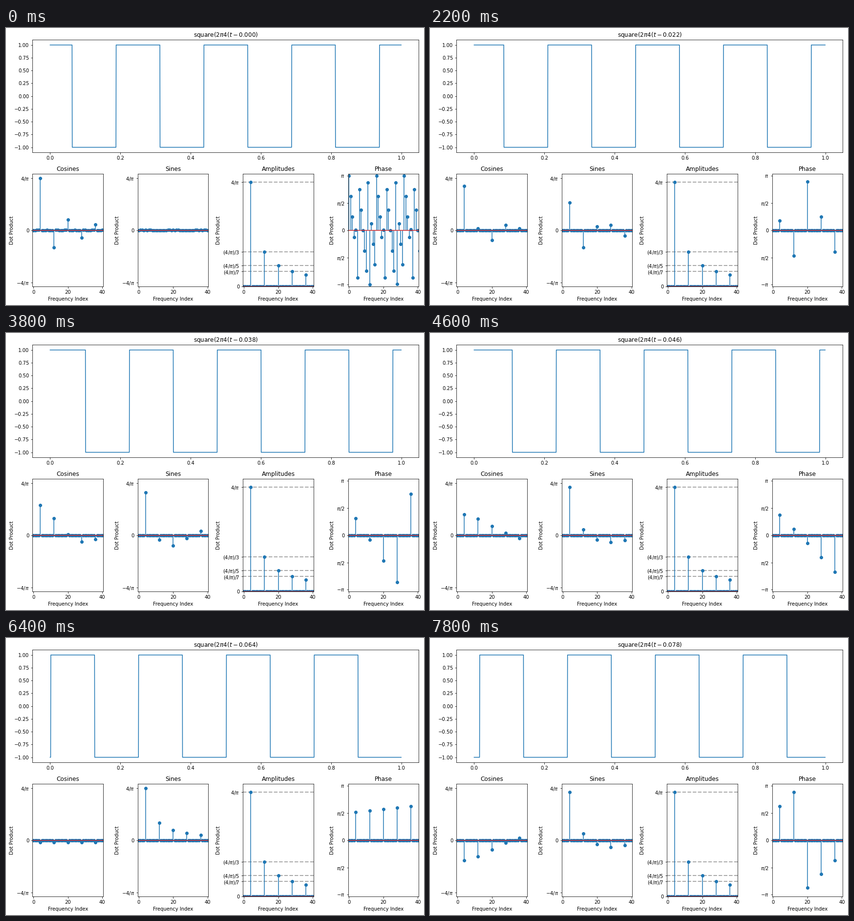
Write a matplotlib script that moves like this. It is 856 by 568 pixels and loops after 8 s.

```python
import numpy as np
import matplotlib.pyplot as plt
from matplotlib.animation import FuncAnimation

W, H, DPI = 856, 568, 72
FRAMES, INTERVAL = 40, 200
FREQ, N = 4, 2000
PEAK = 4 / np.pi

plt.rcParams.update({"font.family": "DejaVu Sans", "font.size": 10})

t = np.arange(N) / N
index = np.arange(50)
angles = 2 * np.pi * np.outer(index, t)
cos_basis, sin_basis = np.cos(angles), np.sin(angles)
shifts = np.linspace(0, 1, 500)[:FRAMES]

fig = plt.figure(figsize=(W / DPI, H / DPI), dpi=DPI, facecolor="white")


def add_axes(left, top, width, height):
    """Place axes by pixel, measured from the top left corner."""
    return fig.add_axes([left / W, 1 - (top + height) / H, width / W, height / H])


def square_wave(shift):
    return np.sign(np.cos(2 * np.pi * FREQ * (t - shift)))


def spectrum(wave):
    """Cosine and sine products, amplitude and phase for each frequency."""
    parts = [basis @ wave * 2 / N for basis in (cos_basis, sin_basis)]
    c, s = [np.where(np.abs(p) < 1e-8, 0.0, p) for p in parts]
    return c, s, np.hypot(c, s), np.arctan2(s, c)


def stem_panel(column, title, ylim, ticks, labels):
    ax = add_axes(54.4 + 215.4 * column, 299.2, 144.6, 230.8)
    stem = ax.stem(index, np.zeros(len(index)))
    ax.set_title(title)
    ax.set_xlabel("Frequency Index")
    ax.set_ylabel("Dot Product")
    ax.set_xlim(-0.5, 40.5)
    ax.set_ylim(*ylim)
    ax.set_xticks([0, 20, 40])
    ax.set_yticks(ticks, labels)
    return ax, stem


def set_stem(stem, values):
    stem.markerline.set_ydata(values)
    stem.stemlines.set_segments([[(k, 0), (k, v)] for k, v in zip(index, values)])


wave_ax = add_axes(54.4, 24.3, 790.8, 230.8)
wave_line, = wave_ax.plot(t, square_wave(0))
wave_title = wave_ax.set_title("")

top = PEAK + 0.1
signed = ((-top, top), [-PEAK, 0, PEAK], [r"$-4/\pi$", "0", r"$4/\pi$"])
levels = [PEAK / n for n in (7, 5, 3, 1)]
level_names = [rf"$(4/\pi)/{n}$" for n in (7, 5, 3)] + [r"$4/\pi$"]

_, cosines = stem_panel(0, "Cosines", *signed)
_, sines = stem_panel(1, "Sines", *signed)
amp_ax, amplitudes = stem_panel(2, "Amplitudes", (0, top),
                                [0] + levels, ["0"] + level_names)
for level in levels:
    amp_ax.axhline(level, color="#aaaaaa", linestyle="--", linewidth=2, zorder=0.9)
_, phases = stem_panel(3, "Phase", (-np.pi - 0.1, np.pi + 0.1),
                       np.linspace(-np.pi, np.pi, 5),
                       [r"$-\pi$", r"$\pi/2$", "0", r"$\pi/2$", r"$\pi$"])
stems = (cosines, sines, amplitudes, phases)


def draw(frame):
    shift = shifts[frame]
    wave = square_wave(shift)
    wave_line.set_ydata(wave)
    wave_title.set_text(rf"square$(2\pi{FREQ}(t-{shift:.3f})$")
    for stem, values in zip(stems, spectrum(wave)):
        set_stem(stem, values)
    return []


anim = FuncAnimation(fig, draw, frames=FRAMES, init_func=lambda: draw(0),
                     interval=INTERVAL, repeat=True, repeat_delay=0, blit=False)
plt.show()
```
